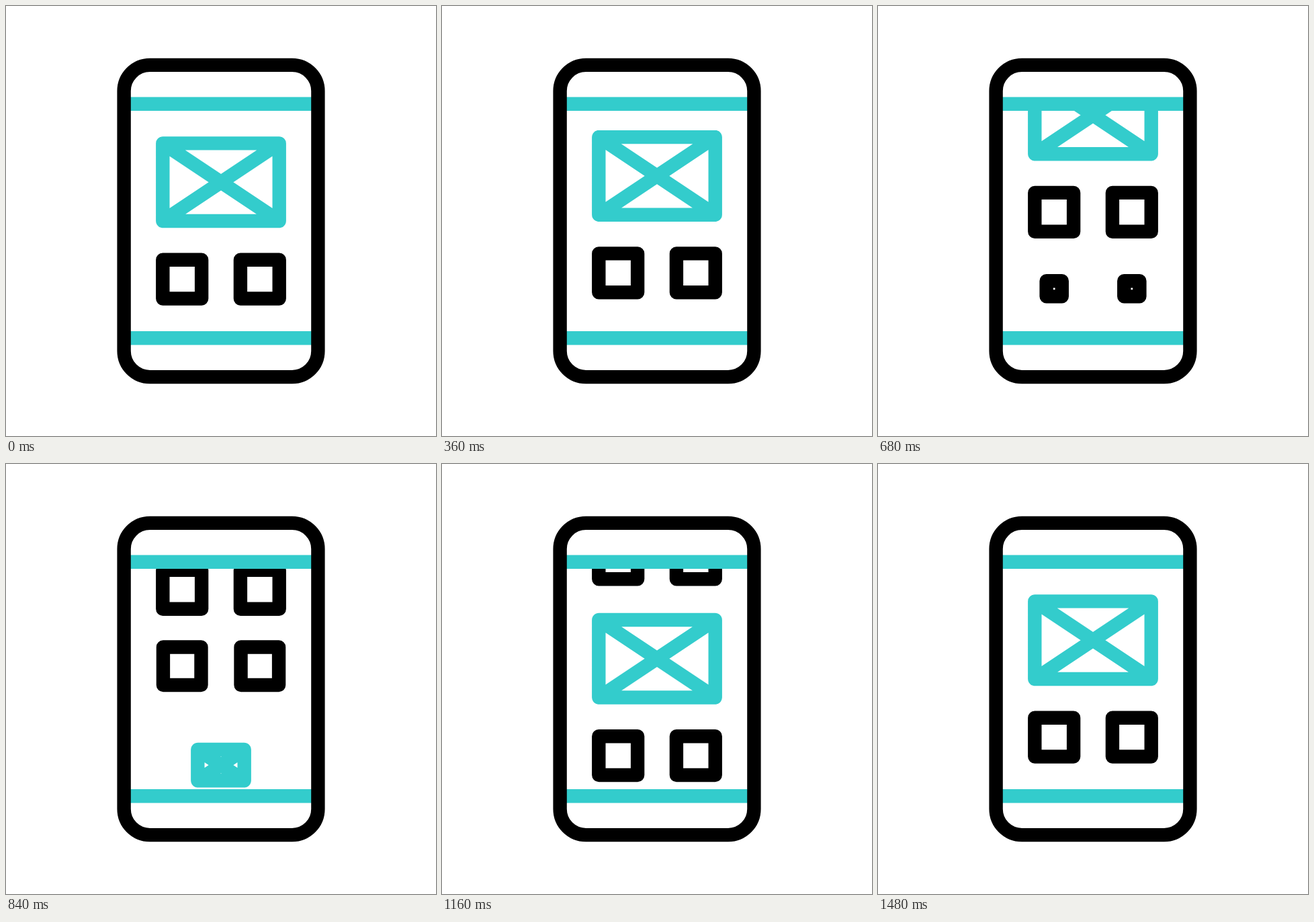
An HTML page with a canvas for the animation above (2000 ms loop, 640 px wide and 640 px high).

```html
<!DOCTYPE html>
<html lang="en">
<head>
<meta charset="utf-8">
<title>Scrolling phone wireframe</title>
<style>
  html, body { margin: 0; width: 100%; height: 100%; overflow: hidden; background: #fff; }
  canvas { display: block; }
</style>
</head>
<body>
<canvas id="stage" width="640" height="640"></canvas>
<script>
const ctx = document.getElementById('stage').getContext('2d');
const LOOP = 2000, STEP = 40;
const TEAL = '#33cccc', BLACK = '#000';
const SCROLL = { start: 160, length: 1320, distance: 405.8, influence: 0.638 };
const POP = { length: 360, influence: 0.45 };

// Content rows: resting centre y, and the time at which each one pops in.
const rows = [
  { draw: picture, y: 262.2 },
  { draw: tiles, y: 406.6 },
  { draw: tiles, y: 520.6, pop: 520 },
  { draw: picture, y: 668, pop: 680 },
  { draw: tiles, y: 812.4, pop: 800 }
];

// Symmetric cubic-bezier(a, 0, 1 - a, 1), solved by bisection.
function ease(x, a) {
  if (x <= 0) return 0;
  if (x >= 1) return 1;
  let lo = 0, hi = 1;
  for (let i = 0; i < 30; i++) {
    const s = (lo + hi) / 2, r = 1 - s;
    const bx = 3 * r * r * s * a + 3 * r * s * s * (1 - a) + s * s * s;
    if (bx < x) lo = s; else hi = s;
  }
  return lo * lo * (3 - 2 * lo);
}

function box(cx, cy, halfW, halfH) {
  ctx.rect(cx - halfW, cy - halfH, halfW * 2, halfH * 2);
}

function line(x1, y1, x2, y2) {
  ctx.moveTo(x1, y1);
  ctx.lineTo(x2, y2);
}

function stroke(color, trace) {
  ctx.strokeStyle = color;
  ctx.beginPath();
  trace();
  ctx.stroke();
}

// Sizes scale with k while the line weight stays constant.
function picture(y, k) {
  const w = 86.7 * k, h = 57.8 * k;
  stroke(TEAL, () => {
    box(320, y, w, h);
    line(320 - w, y - h, 320 + w, y + h);
    line(320 - w, y + h, 320 + w, y - h);
  });
}

function tiles(y, k) {
  for (const x of [262.2, 377.8]) {
    stroke(BLACK, () => box(x, y, 28.9 * k, 28.9 * k));
  }
}

function render(t) {
  ctx.fillStyle = '#fff';
  ctx.fillRect(0, 0, 640, 640);
  ctx.lineWidth = 20.4;
  ctx.lineJoin = ctx.lineCap = 'round';

  const shift = SCROLL.distance * ease((t - SCROLL.start) / SCROLL.length, SCROLL.influence);
  ctx.save();
  ctx.beginPath();
  ctx.rect(176, 146, 288, 359);
  ctx.clip();
  for (const row of rows) {
    const k = row.pop ? ease((t - row.pop) / POP.length, POP.influence) : 1;
    if (k > 0) row.draw(row.y - shift, k);
  }
  ctx.restore();

  ctx.lineCap = 'butt';
  for (const y of [145.8, 494.2]) {
    stroke(TEAL, () => line(176, y, 464, y));
  }
  stroke(BLACK, () => ctx.roundRect(175.6, 87.9, 288.8, 464.2, 38.7));
}

function tick() {
  const t = performance.now() % LOOP;
  render(Math.floor(t / STEP) * STEP);
  requestAnimationFrame(tick);
}
tick();
</script>
</body>
</html>
```
